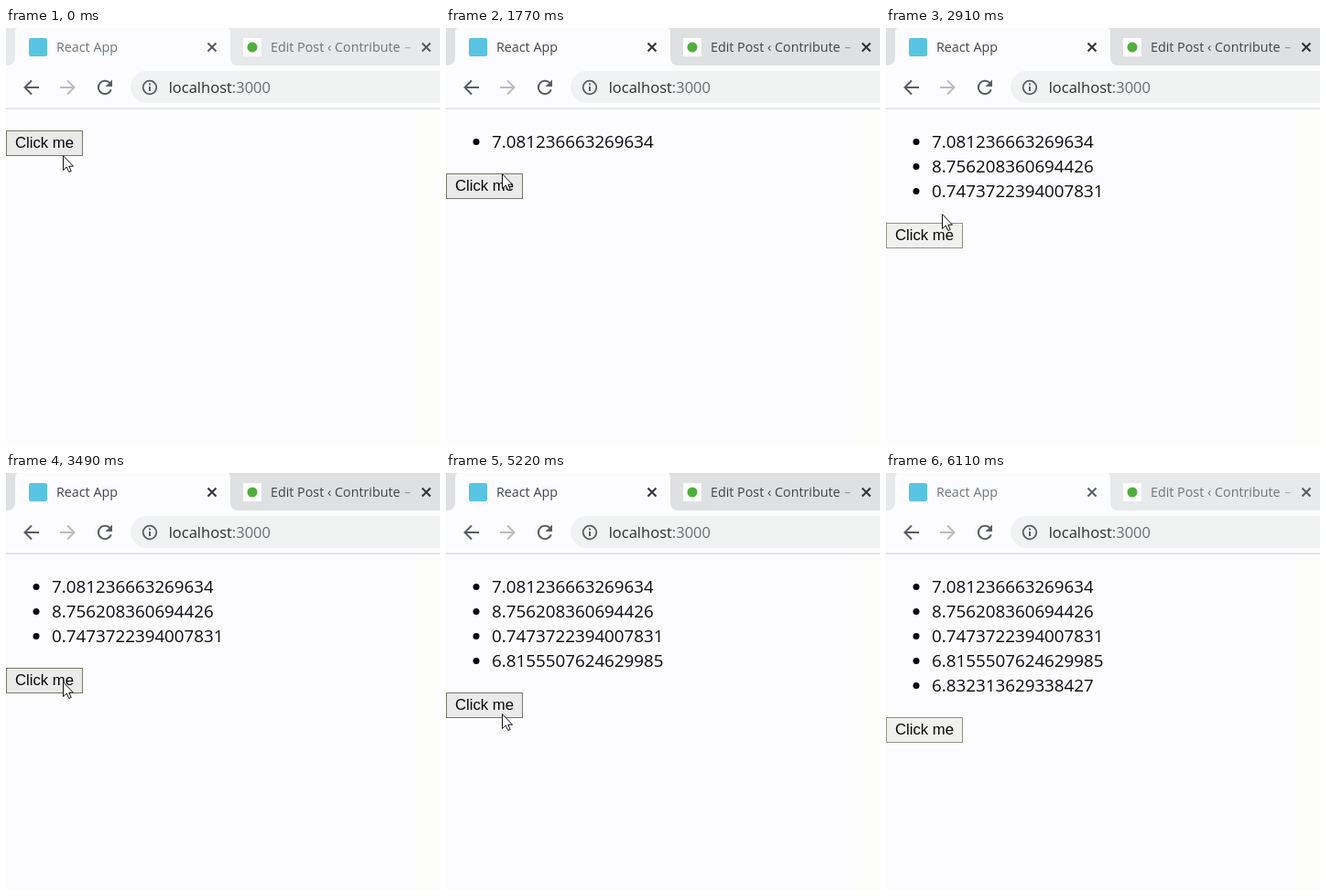
An HTML page that plays this animation: 474 by 456 pixels, repeating every 6160 ms.

```html
<!DOCTYPE html>
<html lang="en">
<head>
<meta charset="utf-8">
<title>Click list</title>
<style>
  html, body { margin: 0; width: 100%; height: 100%; overflow: hidden; background: #fcfcff; }
  svg { display: block; width: 474px; height: 456px; }
  text { font-family: "Open Sans", "Noto Sans", sans-serif; white-space: pre; }
  .title { font-size: 14.3px; }
  .url { font-size: 16.5px; fill: #2c2d30; }
  .item { font-size: 18.8px; fill: #0c0c0c; }
  .label { font: 16.7px "Liberation Sans", Arial, sans-serif; fill: #080808; }
  .line { fill: none; stroke-width: 2; }
</style>
</head>
<body>
<svg viewBox="0 0 474 456">
  <rect width="474" height="456" fill="#fcfcff"/>
  <rect x="448" y="89" width="26" height="367" fill="#fcfcfa"/>

  <!-- tab strip -->
  <rect id="strip" width="474" height="41"/>
  <path fill="#fcfcff" d="M0 41Q10 41 10 32V6Q10 -2 18 -2H237Q245 -2 245 6V32Q245 41 254 41Z"/>
  <rect x="25" y="11" width="20" height="20" rx="2" fill="#58c4e2"/>
  <rect x="259" y="11" width="20" height="20" fill="#fff"/>
  <circle cx="269" cy="21" r="5.5" fill="#4fae3c"/>
  <g id="titles">
    <text class="title" x="55" y="26">React App</text>
    <text class="title" x="289" y="26">Edit Post ‹ Contribute</text>
    <text class="title" x="435" y="26" opacity=".5">–</text>
  </g>
  <path id="closers" class="line" d="M220.5 16.5l9 9m0-9l-9 9M454.5 16.5l9 9m0-9l-9 9"/>

  <!-- toolbar -->
  <rect y="41" width="474" height="47" fill="#fcfcff"/>
  <rect x="136" y="47" width="360" height="35" rx="17.5" fill="#f1f3f2"/>
  <rect y="87.5" width="474" height="1.2" fill="#d9dbdc"/>
  <g class="line" stroke="#5a5d62">
    <path d="M36 65H21M28 57.5L20.5 65L28 72.5"/>
    <path stroke="#babcbf" d="M59 65H74M67 57.5L74.5 65L67 72.5"/>
    <path d="M113.5 60.2A7.2 7.2 0 1 0 114.800 67.3"/>
    <circle cx="157" cy="65" r="7.3" stroke-width="1.8"/>
    <path d="M157 64v5M157 60.5v2"/>
  </g>
  <path fill="#5a5d62" d="M116 56.5V64H108.5Z"/>
  <text class="url" x="177.7" y="71">localhost<tspan fill="#6a6d72">:3000</tspan></text>

  <!-- page -->
  <g id="list"></g>
  <g id="button">
    <rect id="face" x=".5" y=".5" width="83" height="27"/>
    <text class="label" x="10" y="19">Click me</text>
  </g>
  <path id="cursor" fill="#fff" stroke="#111" d="M.5 .7V16.5L4.2 13L6.8 18.5L9.2 17.5L6.8 12.2H11.5Z"/>
</svg>
<script>
const LOOP = 6160;
const $ = id => document.getElementById(id);

// Click time and the number it adds
const clicks = {
  1470: "7.081236663269634",
  2140: "8.756208360694426",
  2820: "0.7473722394007831",
  3790: "6.8155507624629985",
  5340: "6.832313629338427"
};
const times = Object.keys(clicks).map(Number);

// Pointer glides; y 467 is below the stage
const glides = [
  { at: 130, ms: 380, x: 68, y: 130 },
  { at: 969, ms: 1, x: 62, y: 134 },
  { at: 1510, ms: 470, x: 61, y: 177 },
  { at: 2180, ms: 300, x: 61, y: 203 },
  { at: 2950, ms: 540, x: 62, y: 228 },
  { at: 3850, ms: 535, x: 168, y: 467 },
  { at: 4840, ms: 380, x: 61, y: 263 },
  { at: 5430, ms: 340, x: 98, y: 467 }
];

const ramp = (t, at, ms) => Math.min(1, Math.max(0, (t - at) / ms));
const ease = k => k * k * (3 - 2 * k);
const grey = (a, b, k) => `hsl(210 5% ${a + (b - a) * k}%)`;

function pointer(t) {
  return glides.reduce((p, g) => {
    const k = ease(ramp(t, g.at, g.ms));
    return { x: p.x + (g.x - p.x) * k, y: p.y + (g.y - p.y) * k };
  }, { x: 62, y: 139 });
}

$("list").innerHTML = times.map((at, i) => `<g transform="translate(0 ${27 * i})">
  <circle cx="33" cy="124.5" r="3.5"/><text class="item" x="50" y="130.5">${clicks[at]}</text></g>`).join("");
const rows = [...$("list").children];

function draw(t) {
  const count = times.filter(at => t >= at).length;
  rows.forEach((row, i) => row.setAttribute("visibility", i < count ? "visible" : "hidden"));

  const top = count ? 132 + 27 * count : 112;
  const { x, y } = pointer(t);
  const hover = x < 84 && y > top && y < top + 28;
  const pressed = times.some(at => t >= at - 80 && t < at);
  $("button").setAttribute("transform", `translate(0 ${top})`);
  $("face").setAttribute("fill", pressed ? "#f5f5f5" : hover ? "#eaeaea" : "#f0f0ef");
  $("face").setAttribute("stroke", hover ? "#777768" : "#949484");
  $("cursor").setAttribute("transform", `translate(${Math.round(x)} ${Math.round(y)})`);

  // Window focus darkens the tab strip
  const focus = ramp(t, 1390, 160) - ramp(t, 6020, 90);
  $("strip").setAttribute("fill", grey(91.5, 88, focus));
  $("titles").setAttribute("fill", grey(46, 27, focus));
  $("closers").setAttribute("stroke", grey(36, 20, focus));
}

const start = performance.now();
function tick() {
  draw((performance.now() - start) % LOOP);
  requestAnimationFrame(tick);
}
tick();
</script>
</body>
</html>
```
